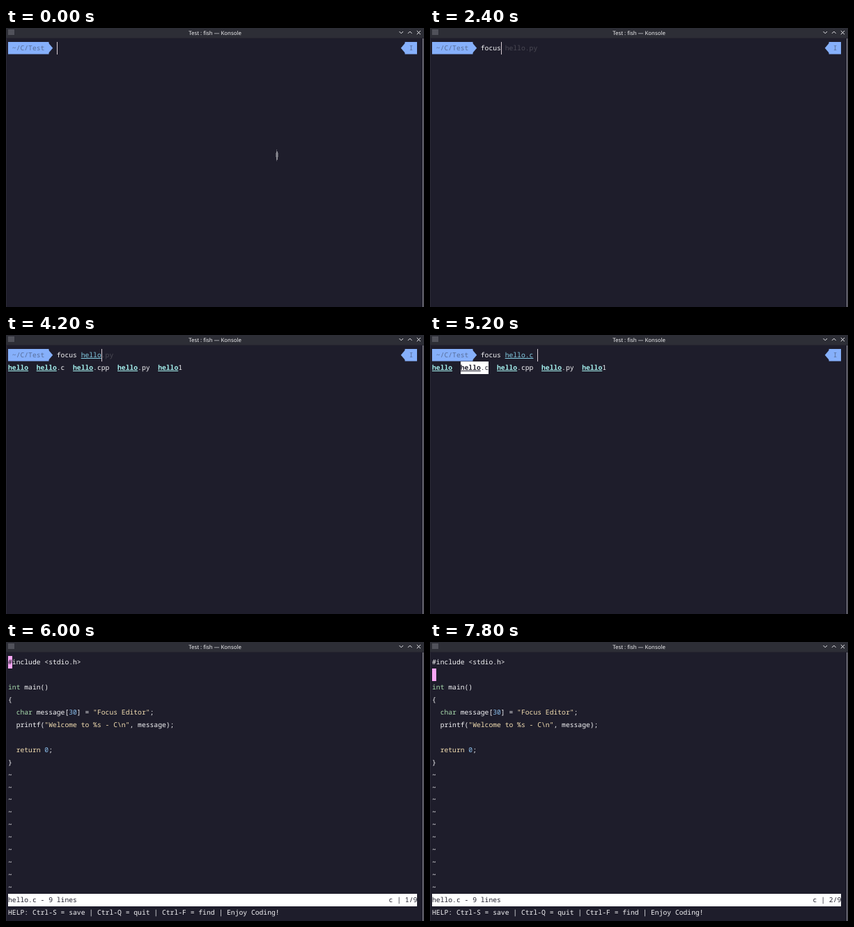
These frames come from a looping animation (600x400 px, 8 s). An HTML page with a canvas:

```html
<!DOCTYPE html>
<html lang="en">
<head>
<meta charset="utf-8">
<title>Terminal</title>
<style>
html, body { margin: 0; width: 100%; height: 100%; overflow: hidden; background: #1e1d2b; }
canvas { display: block; }
</style>
</head>
<body>
<canvas id="stage" width="600" height="400"></canvas>
<script>
const ctx = document.getElementById('stage').getContext('2d');
const LOOP = 8000, LEFT = 3, CELL = 5.815, ROW = 17.95, COLS = 101;
const BG = '#1e1d2b', WHITE = '#f6f6f8', BLUE = '#86b0fb', CYAN = '#86cfe6',
      AQUA = '#a5f0ee', GREY = '#4b4a55', PINK = '#fba6f6',
      GREEN = '#a9dcae', YELLOW = '#f4dfb2', NUMBER = '#8abdea';
const MONO = '9.69px "Noto Sans Mono", "DejaVu Sans Mono", monospace';

const colX = c => LEFT + c * CELL;
const rowTop = r => Math.round(19.8 + r * ROW);
const baseline = r => Math.round(32 + r * ROW);

function rect(x, y, w, h, color) {
  ctx.fillStyle = color;
  ctx.fillRect(x, y, w, h);
}

function shape(points, color) {
  ctx.fillStyle = color;
  ctx.beginPath();
  points.forEach(([x, y]) => ctx.lineTo(x, y));
  ctx.fill();
}

function line(points, color, width) {
  ctx.strokeStyle = color;
  ctx.lineWidth = width;
  ctx.beginPath();
  points.forEach(([x, y], i) => i ? ctx.lineTo(x, y) : ctx.moveTo(x, y));
  ctx.stroke();
}

// Write text on the character grid; returns the next column.
function put(text, col, row, color = WHITE, { bold = false, under = false } = {}) {
  ctx.font = (bold ? 'bold ' : '') + MONO;
  ctx.textAlign = 'left';
  ctx.fillStyle = color;
  [...text].forEach((ch, i) => ctx.fillText(ch, colX(col + i), baseline(row)));
  if (under) rect(colX(col), baseline(row) + 1, text.length * CELL, 1, color);
  return col + text.length;
}

function putRuns(row, col, runs) {
  for (const [text, color] of runs) col = put(text, col, row, color);
}

function block(col, row, n, color) {
  const x = Math.round(colX(col));
  rect(x, rowTop(row), Math.round(colX(col + n)) - x, 18, color);
}

function drawWindow() {
  rect(0, 0, 600, 400, BG);
  rect(0, 15, 1, 385, '#2b2a36');
  rect(598, 15, 1, 385, '#8f8f98');
  rect(599, 15, 1, 385, '#33323c');
  rect(0, 0, 600, 14, '#2d2e36');
  rect(0, 14, 600, 1, '#25242f');
  rect(3, 2, 9, 8, '#50515a');
  ctx.font = '7.85px "Noto Sans", "Open Sans", sans-serif';
  ctx.textAlign = 'center';
  ctx.fillStyle = '#f0f0f2';
  ctx.fillText('Test : fish — Konsole', 300, 10);
  const icon = '#e6e6ea';
  line([[564.5, 5], [567.3, 7.8], [570.1, 5]], icon, 1);
  line([[577, 7.8], [579.8, 5], [582.6, 7.8]], icon, 1);
  line([[589.8, 4], [595, 9.2]], icon, 1);
  line([[595, 4], [589.8, 9.2]], icon, 1);
}

function drawPrompt() {
  rect(3, 20, 58.5, 17.5, BLUE);
  shape([[61, 21.5], [67.2, 28.7], [61, 36]], BLUE);
  put('~/C/Test', 1, 0, '#586e9a');
  rect(572.6, 20, 17.4, 17.5, BLUE);
  shape([[573, 21.5], [566.8, 28.7], [573, 36]], BLUE);
  put('I', 99, 0, '#586e9a');
}

function drawPointer() {
  const c = '#8b8b93';
  rect(388, 177, 2, 12, c);
  rect(387, 179, 4, 6, 'rgba(139,139,147,.55)');
  rect(388, 174, 1, 3, '#55555f');
  rect(388, 189, 1, 2, '#55555f');
}

const COMMAND = 'focus hello.py';
const KEYS = [1000, 1200, 1400, 1600, 1800, 2800, 3400, 3600, 3800, 3900, 4000];
const FILES = ['hello', 'hello.c', 'hello.cpp', 'hello.py', 'hello1'];
const PICKS = [4600, 5000];
const MENU_ON = 4200, MENU_OFF = 5600, EDITOR_ON = 6000, MOVE_DOWN = 7800;

function drawMenu(pick) {
  let col = 0;
  FILES.forEach((name, i) => {
    const on = i === pick;
    if (on) block(col, 1, name.length, '#ffffff');
    put('hello', col, 1, on ? BG : AQUA, { bold: true, under: true });
    put(name.slice(5), col + 5, 1, on ? BG : WHITE);
    col += name.length + 2;
  });
}

function drawShell(t) {
  drawPrompt();
  const pick = PICKS.filter(k => t >= k).length - 1;
  const typed = KEYS.filter(k => t >= k).length;
  const text = pick < 0 ? COMMAND.slice(0, typed) : 'focus ' + FILES[pick] + ' ';
  let col = put(text.slice(0, 6), 12, 0);
  const arg = text.slice(6).trim();
  if (arg) put(arg, 18, 0, CYAN, { under: true });
  col = 12 + text.length;
  if (typed && pick < 0) put(COMMAND.slice(typed), col, 0, GREY);
  rect(Math.round(colX(col)), 20, 1, 18, '#d8cdd4');
  if (t >= MENU_ON && t < MENU_OFF) drawMenu(pick);
  if (t < KEYS[0]) drawPointer();
}

function drawEditor(t) {
  const cur = t >= MOVE_DOWN ? 1 : 0;
  block(0, cur, 1, PINK);
  put('#', 0, 0, cur ? WHITE : BG);
  put('include <stdio.h>', 1, 0);
  putRuns(2, 0, [['int', GREEN], [' main()', WHITE]]);
  put('{', 0, 3);
  putRuns(4, 2, [['char', GREEN], [' message[', WHITE], ['30', NUMBER],
    ['] = ', WHITE], ['"Focus Editor"', YELLOW], [';', WHITE]]);
  putRuns(5, 2, [['printf(', WHITE], ['"Welcome to %s - C\\n"', YELLOW], [', message);', WHITE]]);
  putRuns(7, 2, [['return', YELLOW], [' ', WHITE], ['0', NUMBER], [';', WHITE]]);
  put('}', 0, 8);
  for (let r = 9; r < 19; r++) put('~', 0, r);
  block(0, 19, COLS, '#ffffff');
  put('hello.c - 9 lines', 0, 19, BG);
  const place = `c | ${cur + 1}/9`;
  put(place, COLS - place.length, 19, BG);
  put('HELP: Ctrl-S = save | Ctrl-Q = quit | Ctrl-F = find | Enjoy Coding!', 0, 20);
}

function draw(t) {
  drawWindow();
  if (t < EDITOR_ON) drawShell(t);
  else drawEditor(t);
}

ctx.textRendering = 'geometricPrecision';
const start = performance.now();
function tick() {
  draw((performance.now() - start) % LOOP);
  requestAnimationFrame(tick);
}
tick();
</script>
</body>
</html>
```
